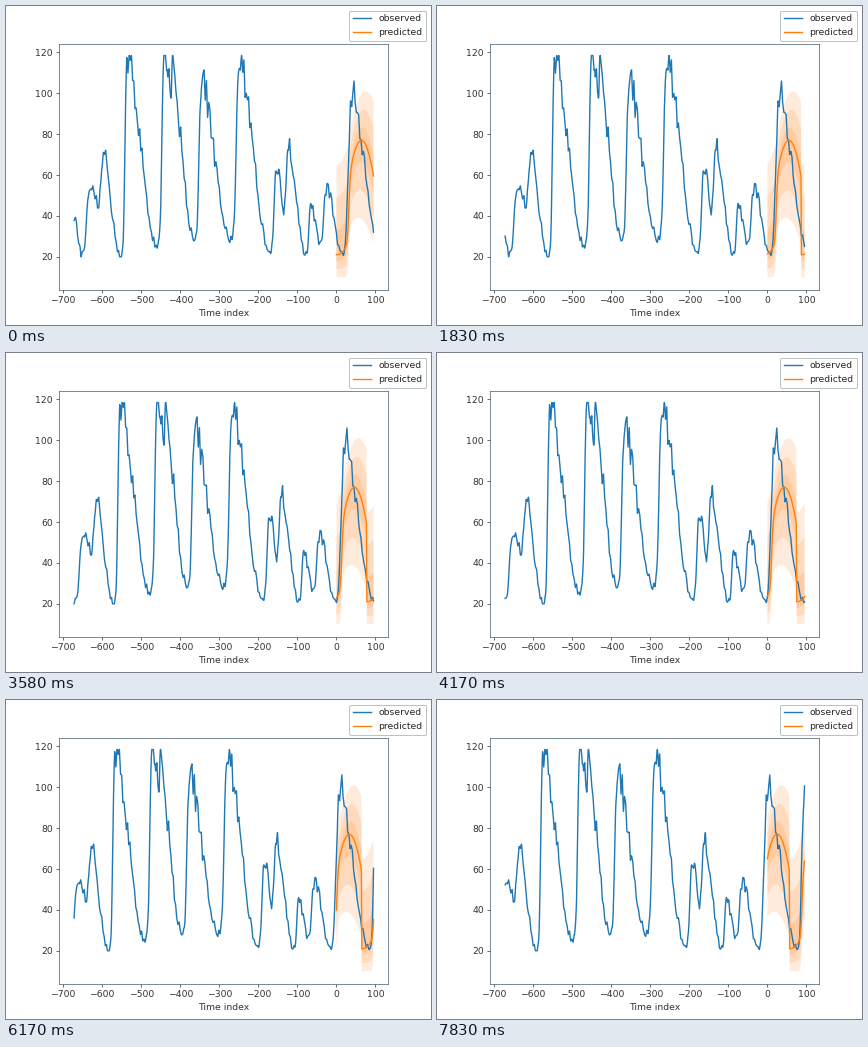
A matplotlib script for the animation above (8 s loop, 425 by 319 pixels).

```python
import matplotlib.pyplot as plt
import numpy as np
from matplotlib.animation import FuncAnimation

DPI = 64
SCALE = 425 / 6.4 / DPI
PAST, AHEAD = 672, 96
STEPS = 40
FRAMES, INTERVAL = 200, 40
SPREADS = (1, 0.64, 0.28)

plt.rcParams.update({
    "font.family": "DejaVu Sans",
    "font.size": 10 * SCALE,
    "lines.linewidth": 1.5 * SCALE,
    "axes.linewidth": 0.8 * SCALE,
    "axes.edgecolor": "#4a6378",
    "text.color": "#262626",
    "axes.labelcolor": "#333333",
    "xtick.color": "#333333",
    "ytick.color": "#333333",
})

# (time, load) at the troughs and peaks of the measured curve
TURNS = [
    (-668, 37), (-653, 21.5), (-629, 53), (-613, 46), (-595, 71),
    (-553, 20), (-531, 118), (-461, 25), (-434, 118), (-426, 100),
    (-419, 113), (-365, 28), (-340, 105), (-272, 28), (-242, 113),
    (-172, 22), (-148, 65), (-138, 43), (-118, 73), (-79, 21), (-62, 46),
    (-45, 28), (-20, 53), (14, 21), (45, 99), (113, 22), (140, 100),
]


def measured(t):
    """Steep rises and slow decays between turning points, plus jitter."""
    times, loads = np.transpose(TURNS)
    i = np.clip(np.searchsorted(times, t, side="right") - 1, 0, len(times) - 2)
    start, end = loads[i], loads[i + 1]
    s = np.clip((t - times[i]) / (times[i + 1] - times[i]), 0, 1)
    rise = s**3 / (s**3 + (1 - s)**3)
    fall = 1 - (1 - s**1.4)**1.8
    base = start + (end - start) * np.where(end > start, rise, fall)
    knots = np.arange(t[0], t[-1] + 4, 3)
    noise = np.random.default_rng(7).uniform(-1, 1, len(knots))
    return np.clip(base * (1 + 0.08 * np.interp(t, knots, noise)), 20, 118.5)


def daily(t, night, growth, top, noon, bend):
    """Quiet night level that switches to a parabola in the morning."""
    p = t % AHEAD
    dark = night + growth * p**2
    light = top - bend * (p - noon)**2
    return dark + (light - dark) / (1 + np.exp((31.5 - p) / 1.8))


def step_at(frame):
    """Five moves a second, held on a clock of twelve ticks a second."""
    tick = (frame * INTERVAL + INTERVAL - 1) * 12 // 1000
    return min(int((tick + 0.5) / 2.4), STEPS - 1)


x_all = np.arange(-PAST, AHEAD)
x_pred = np.arange(AHEAD)
load = measured(np.arange(-PAST, AHEAD + STEPS))

fig, ax = plt.subplots(figsize=(425 / DPI, 319 / DPI), dpi=DPI)
fig.subplots_adjust(right=0.899)
ax.set_xlabel("Time index")
observed, = ax.plot([], [], color="C0", label="observed")
predicted, = ax.plot([], [], color="C1", label="predicted")
bands = [ax.fill([0, 1, 1], [20, 20, 21], color="C1", alpha=0.15, lw=0)[0]
         for _ in SPREADS]
ax.set_xlim(-710.35, 132.3)
ax.set_ylim(3.8, 124)
fig.legend(framealpha=1, edgecolor="#b0bcc2")


def draw(frame):
    step = step_at(frame)
    t = x_pred + step
    mid = daily(t, 21, 0.006, 77, 64, 0.0182)
    high = daily(t, 65, 0.011, 101, 75, 0.0125)
    low = daily(t, 10, 0, 39, 56, 0.0082)
    observed.set_data(x_all, load[step:step + len(x_all)])
    predicted.set_data(x_pred, mid)
    for band, spread in zip(bands, SPREADS):
        top = np.column_stack([x_pred, mid + spread * (high - mid)])
        bottom = np.column_stack([x_pred, mid + spread * (low - mid)])
        band.set_xy(np.vstack([top, bottom[::-1]]))
    return [observed, predicted, *bands]


anim = FuncAnimation(fig, draw, frames=FRAMES, interval=INTERVAL, repeat=True)
plt.show()
```
